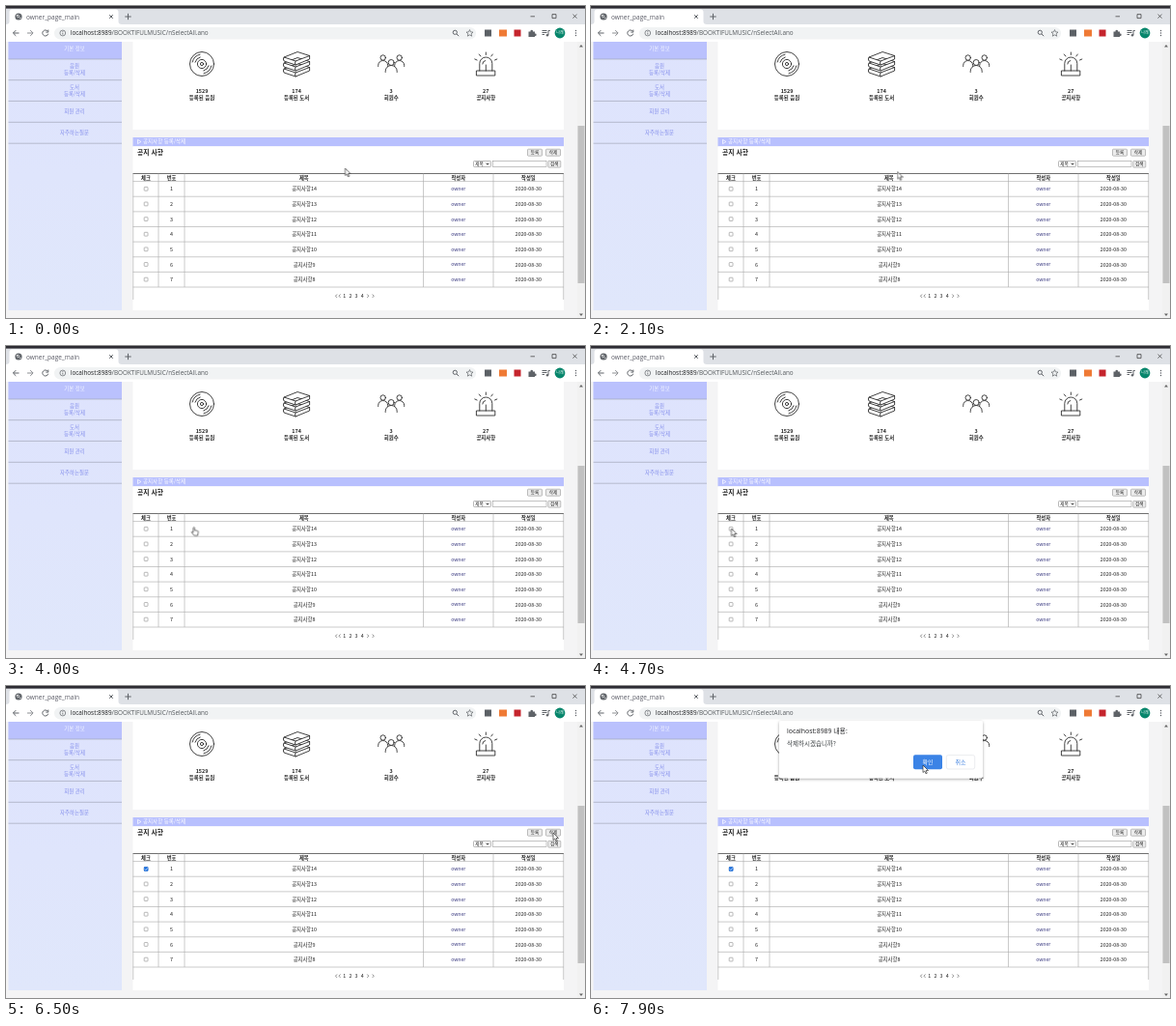
An HTML page that plays this animation: 600 px wide and 323 px high, repeating every 8 s.

```html
<!DOCTYPE html>
<html lang="ko">
<head>
<meta charset="utf-8">
<title>owner_page_main</title>
<style>
html, body { margin: 0; width: 100%; height: 100%; overflow: hidden; background: #f4f4f5; }
svg { display: block; width: 600px; height: 323px; }
text { font-family: "Noto Sans CJK KR", "Noto Sans CJK", "Noto Sans CJK JP", "Noto Sans", sans-serif; white-space: pre; }
.ui { font-family: "Open Sans", "Noto Sans CJK KR", "Noto Sans CJK", sans-serif; }
.icon { fill: none; stroke: #222; stroke-width: 0.85; stroke-linejoin: round; stroke-linecap: round; }
.glyph { fill: none; stroke: #5f6368; stroke-width: 1; }
#cursor { animation: move 8s infinite; }
#arrow { animation: arrow 8s step-end infinite; }
#hand { animation: hand 8s step-end infinite; }
#tick { animation: tick 8s step-end infinite; }
#dialog { animation: dialog 8s step-end infinite; }

/* each step lasts 100 ms */
@keyframes move {
  0% { transform: translate(351.5px, 168px); animation-timing-function: steps(1); }
  2.5% { transform: translate(351.5px, 168px); animation-timing-function: steps(19); }
  26.25% { transform: translate(317.5px, 171.5px); animation-timing-function: steps(11); }
  40% { transform: translate(257px, 185px); animation-timing-function: steps(14); }
  57.5%, 62.5% { transform: translate(145.5px, 189px); animation-timing-function: steps(7); }
  71.25% { transform: translate(436px, 168px); animation-timing-function: steps(7); }
  80%, 88.75% { transform: translate(567px, 152px); animation-timing-function: steps(7); }
  97.5%, 100% { transform: translate(344px, 82px); }
}
@keyframes arrow { 0%, 51.25% { opacity: 1; } 36.25% { opacity: 0; } }
@keyframes hand { 0%, 51.25% { opacity: 0; } 36.25% { opacity: 1; } }
@keyframes tick { 0% { opacity: 0; } 61.25%, 100% { opacity: 1; } }
@keyframes dialog { 0% { opacity: 0; } 82.5%, 100% { opacity: 1; } }
</style>
</head>
<body>
<svg id="stage" viewBox="0 0 600 323" xmlns="http://www.w3.org/2000/svg"></svg>
<script>
const rect = (x, y, w, h, fill, more = '') =>
  `<rect x="${x}" y="${y}" width="${w}" height="${h}" fill="${fill}" ${more}/>`;
const line = (x1, y1, x2, y2, color = '#a5a5a5', width = 0.6) =>
  `<path d="M${x1} ${y1}L${x2} ${y2}" stroke="${color}" stroke-width="${width}"/>`;
const path = (d, cls = 'glyph', more = '') => `<path class="${cls}" d="${d}" ${more}/>`;
const circle = (x, y, r, more) => `<circle cx="${x}" cy="${y}" r="${r}" ${more}/>`;

// y is the visual middle of the text
function label(x, y, str, o = {}) {
  const { size = 5.4, fill = '#222', anchor = 'middle', weight = 400, cls = '' } = o;
  return `<text class="${cls}" x="${x}" y="${y + size * 0.37}" font-size="${size}" fill="${fill}" ` +
    `text-anchor="${anchor}" font-weight="${weight}">${str}</text>`;
}

function browser() {
  const url = '<tspan fill="#202124">localhost:8989</tspan>/BOOKTIFULMUSIC/nSelectAll.ano';
  return rect(0, 0, 600, 19, '#dee1e6') + rect(0, 0, 600, 2.6, '#2d2c33') +
    '<path d="M0 19Q3.500 19 3.500 16V6.500Q3.500 3.500 6.500 3.500H113.500Q116.500 3.500 116.500 6.500V16Q116.500 19 120 19Z" fill="#fff"/>' +
    circle(13, 11, 3.6, 'fill="#5f6368"') +
    path('M11 9.500h2l1 1.200-1.500 1.300zM14 12.500h1.500', 'glyph', 'style="stroke:#fff;stroke-width:.7"') +
    label(21, 11.2, 'owner_page_main', { size: 6.5, anchor: 'start', fill: '#5a5b66', cls: 'ui' }) +
    path('M107.200 9.200l3.600 3.600m0-3.600l-3.600 3.600M123.300 11h6.400m-3.200-3.200v6.400') +
    path('M543.500 10.800h4.500M566 8.600h4v4h-4zM587.500 8.600l4 4m0-4l-4 4', 'glyph', 'style="stroke:#333;stroke-width:.7"') +
    rect(0, 19, 600, 18, '#fff') +
    rect(50, 22, 437, 12.5, '#f1f3f4', 'rx="6.2"') +
    path('M13.500 28H7.500m2.800-2.900L7.400 28l2.900 2.900') +
    path('M22 28h6m-2.800-2.900L28.100 28l-2.900 2.900', 'glyph', 'style="stroke:#8b8e92"') +
    path('M43.200 26.200a3 3 0 1 0 .5 2.500M43.800 24.600v2.500h-2.500') +
    circle(58.8, 28, 2.9, 'class="glyph" style="stroke-width:.7"') +
    path('M58.800 27.600v2M58.800 26v.8', 'glyph', 'style="stroke-width:.8"') +
    label(66.8, 28, url, { size: 6.35, anchor: 'start', fill: '#54585c', cls: 'ui' }) +
    circle(465.3, 27.3, 2.1, 'class="glyph"') + path('M467 29l2.200 2.200') +
    path('M480.500 24.600l1 2.300 2.500.2-1.900 1.700.6 2.400-2.200-1.300-2.200 1.300.6-2.400-1.900-1.700 2.500-.2z',
      'glyph', 'style="stroke-width:.7"') +
    rect(496, 24.5, 7, 7, '#5c6166') + rect(511, 24.5, 8, 7, '#ef7a35') + rect(526.5, 24.5, 7, 7, '#c5252d') +
    '<path d="M541.500 26.500h2a1.300 1.300 0 1 1 2.500 0h2v2a1.300 1.300 0 1 1 0 2.500v1h-6.500z" fill="#5f6368"/>' +
    path('M555.500 25.500h5m-5 2h5m-5 2h2.500M562 30v-4.500h1.800') + circle(561, 30.2, 1.2, 'fill="#5f6368"') +
    circle(574, 28, 5.4, 'fill="#07866c"') + label(574, 28, '나래', { size: 4, fill: '#fff' }) +
    [25.5, 28, 30.5].map(y => circle(590.5, y, 0.75, 'fill="#5f6368"')).join('');
}

function sidebar() {
  const items = [[62, '음원'], [69, '등록/삭제'], [84, '도서'], [91, '등록/삭제'], [109, '회원 관리'], [131, '자주하는질문']];
  return rect(2.5, 37, 117.5, 278, 'url(#side)') + rect(2.5, 37, 117.5, 18, '#bac1fd') +
    label(71, 44, '기본 정보', { fill: '#f2f4ff' }) +
    items.map(([y, s]) => label(71, y, s, { fill: '#858fec' })).join('') +
    [55, 76.7, 98.4, 120.3, 142.2].map(y => line(2.5, y, 120, y, '#a3a7b8', 0.7)).join('');
}

function summary() {
  const disc = circle(0, 0, 12.5, '') + circle(0, 0, 4.6, '') + circle(0, 0, 1.6, '') +
    '<path d="M-9.800-2A10 10 0 0 1-2-9.800M-7-1.800A7.300 7.300 0 0 1-1.800-7M9.800 2A10 10 0 0 1 2 9.800M7 1.800A7.300 7.300 0 0 1 1.800 7"/>';
  const book = y => `<path transform="translate(0 ${y})" fill="#fff" d="M-13-5L1-10.500 13.500-6.500V-3L-1 3-13-1Q-14.500-3-13-5L-1-1 13.500-6.500M-1-1Q-2.500 1-1 3"/>`;
  const books = [10, 4, -2].map(book).join('');
  const person = (x, y, r, w) => circle(x, y, r, 'fill="#fff"') +
    `<path fill="#fff" d="M${x - w} ${y + w + 4}v-1a${w} ${w} 0 0 1 ${2 * w} 0v1"/>`;
  const people = person(-8.5, -6.5, 2.7, 5) + person(8.5, -6.5, 2.7, 5) + person(0, -1.5, 3, 6);
  const siren = '<path d="M-6.500 7V-.500a6.500 6.500 0 0 1 13 0V7M-9.500 7h19v5h-19zM-3.500 0a3.500 3.500 0 0 1 3-3.500M0 1v6' +
    'M0-12v2.500M-7-10l1.500 2M7-10l-1.500 2M-11.500-5l2.300 1M11.500-5l-2.300 1"/>';
  const cards = [[disc, '1529', '등록된 음원'], [books, '174', '등록된 도서'], [people, '3', '회원수'], [siren, '27', '공지사항']];
  return rect(131.5, 37, 446.5, 91, '#fff') + cards.map(([icon, n, name], i) => {
    const x = 203 + i * 98.1;
    return `<g class="icon" transform="translate(${x} 60)">${icon}</g>` +
      label(x, 88, n, { weight: 700 }) + label(x, 95, name, { weight: 700 });
  }).join('');
}

const button = (x, y, w, h, s) => rect(x, y, w, h, '#ececec', 'stroke="#959595" stroke-width=".6" rx=".8"') +
  label(x + w / 2, y + h / 2, s, { size: 4.6, weight: 500 });

function notices() {
  const cols = [131.8, 158, 185, 432.5, 505, 577.7];
  const mid = i => (cols[i] + cols[i + 1]) / 2;
  const top = 181.6, pitch = 15.63, end = top + 7 * pitch;
  let out = rect(131.5, 136, 446.5, 9.3, '#b8c0fe') +
    path('M136.500 138.400v4.200l3.400-2.100z', 'glyph', 'style="stroke:#fff;stroke-width:.7"') +
    label(142, 140.4, '공지사항 등록/삭제', { fill: '#fff', anchor: 'start', size: 5.5 }) +
    rect(131.5, 145.3, 446.5, 169.7, '#fff') +
    label(136, 151.2, '공지 사항', { size: 6.8, weight: 700, anchor: 'start' }) +
    button(540.5, 148.2, 15, 7, '등록') + button(559.5, 148.2, 15, 7, '삭제') +
    rect(484.5, 160.5, 18, 6, '#fff', 'stroke="#8a8a8a" stroke-width=".6" rx=".8"') +
    label(490.5, 163.5, '제목', { size: 4.5, weight: 500 }) +
    path('M497.500 162.700l1.500 1.500 1.500-1.500', 'glyph', 'style="stroke:#222"') +
    rect(504.5, 160.5, 55.5, 6, '#fff', 'stroke="#999" stroke-width=".6"') + button(561.8, 160.3, 13, 6.8, '검색') +
    line(131.5, 173.5, 578, 173.5, '#707070', 1);

  ['체크', '번호', '제목', '작성자', '작성일'].forEach((s, i) => { out += label(mid(i), 177.7, s, { weight: 700, size: 5.3 }); });
  cols.forEach((x, i) => { out += line(x, 173.5, x, i % 5 ? end : 304, '#a8a8a8'); });
  for (let r = 0; r < 7; r++) {
    const y = top + pitch * r, c = y + pitch / 2;
    out += line(131.5, y, 578, y, '#a8a8a8') +
      rect(143.2, c - 2, 3.8, 3.8, '#fff', 'stroke="#8a8a8a" stroke-width=".6" rx=".6"') +
      label(mid(1), c, r + 1) + label(mid(2) + 0.3, c, '공지사항' + (14 - r), { weight: 500 }) +
      label(mid(3), c, 'owner', { size: 5.1, fill: '#35357d' }) + label(mid(4), c, '2020-08-30', { size: 5.25 });
  }
  out += line(131.5, end, 578, end, '#a8a8a8');
  ['1', '2', '3', '4'].forEach((s, i) => { out += label(350.7 + i * 6.2, 300, s); });
  out += path('M343 298.500l-1.500 1.700 1.500 1.700m3.500-3.400l-1.500 1.700 1.500 1.700M374.300 298.500l1.500 1.700-1.500 1.700m5.400-3.400l1.500 1.700-1.500 1.700',
    'glyph', 'style="stroke:#444;stroke-width:.6"');
  return out + '<g id="tick">' + rect(142.9, 187.2, 4.5, 4.5, '#1a6fe0', 'rx=".7"') +
    path('M143.700 189.400l1.200 1.200 1.800-2.200', 'glyph', 'style="stroke:#fff;stroke-width:.7"') + '</g>';
}

const dialog = () => '<g id="dialog">' +
  rect(195, 36, 211, 59.5, '#fff', 'rx="2" filter="url(#shadow)"') +
  label(203, 46.4, 'localhost:8989 내용:', { size: 6.9, anchor: 'start', fill: '#202124', cls: 'ui' }) +
  label(203, 59.3, '삭제하시겠습니까?', { size: 6.5, anchor: 'start', fill: '#3c4043' }) +
  rect(334, 71.3, 30, 15, '#3b83e6', 'rx="2"') + label(349, 78.7, '확인', { size: 6, fill: '#fff', weight: 500 }) +
  rect(368.3, 71.6, 29.4, 14.4, '#fff', 'rx="2" stroke="#e2e4e8" stroke-width=".7"') +
  label(383, 78.7, '취소', { size: 6, fill: '#3b7fe0' }) + '</g>';

const cursor = () => '<g id="cursor" fill="#fff" stroke="#333" stroke-width=".7" stroke-linejoin="round">' +
  '<path id="arrow" d="M0 0V7.500L1.800 6 3 8.800 4.300 8.200 3.100 5.500H5.500Z"/>' +
  '<path id="hand" d="M.800.800Q1.500-.200 2.200.800V3.500L5.500 4.200Q6.200 4.500 6 5.500L5.300 9H1.800L-.900 5.800Q-1.200 4.800 0 5L.800 5.600Z"/></g>';

document.getElementById('stage').innerHTML =
  '<defs><linearGradient id="side" x2="0" y2="1"><stop stop-color="#dee3fd"/><stop offset="1" stop-color="#e0e7fb"/></linearGradient>' +
  '<filter id="shadow" x="-10%" y="-20%" width="120%" height="150%"><feDropShadow dx="0" dy="1" stdDeviation="1.6" flood-opacity=".35"/></filter></defs>' +
  rect(0, 0, 600, 323, '#f4f4f5') + sidebar() + summary() + notices() +
  rect(592, 37, 8, 286, '#f1f1f1') + rect(592.5, 124, 7, 163, '#c1c1c1') +
  '<path d="M594 42.500l2-2.500 2 2.500zM594 318.500l2 2.500 2-2.500z" fill="#666"/>' +
  browser() + dialog() + cursor();
</script>
</body>
</html>
```
